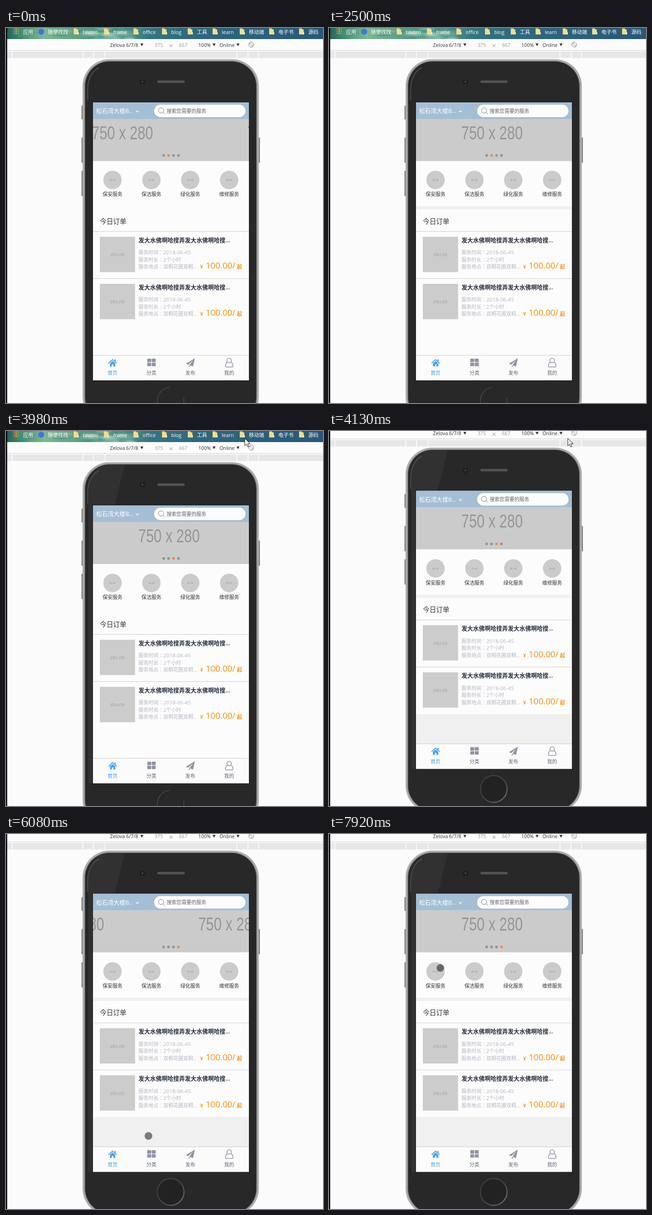
Animation, 689 px wide and 812 px high, one loop 8 s. Source, as an HTML page:

```html
<!DOCTYPE html>
<html lang="zh-CN">
<head>
<meta charset="utf-8">
<style>
html, body { margin: 0; width: 100%; height: 100%; overflow: hidden; background: #fbfbfb; }
svg { display: block; width: 689px; height: 812px; font-family: 'Open Sans', 'Noto Sans CJK SC', 'Noto Sans CJK', sans-serif; }
text { white-space: pre; }
</style>
</head>
<body>
<svg viewBox="0 0 689 812">
  <defs>
    <linearGradient id="sky">
      <stop offset="0" stop-color="#1f5f58"/><stop offset=".04" stop-color="#3f8a70"/>
      <stop offset=".12" stop-color="#7db794"/><stop offset=".22" stop-color="#5fa287"/>
      <stop offset=".3" stop-color="#3f8a7c"/><stop offset=".37" stop-color="#5c9f93"/>
      <stop offset=".45" stop-color="#357581"/><stop offset=".6" stop-color="#2e687f"/>
      <stop offset="1" stop-color="#285879"/>
    </linearGradient>
    <filter id="soft" x="-50%" y="-100%" width="200%" height="300%"><feGaussianBlur stdDeviation="4 2"/></filter>
    <clipPath id="skyClip"><path d="M0 0H689V24H0z"/></clipPath>
    <linearGradient id="rim" x2="1" y2="1">
      <stop offset="0" stop-color="#3a3a3a"/><stop offset=".5" stop-color="#444"/><stop offset="1" stop-color="#777"/>
    </linearGradient>
    <pattern id="mesh" width="2" height="2" patternUnits="userSpaceOnUse">
      <rect width="2" height="2" fill="#3c3c3c"/><path d="M0 0h1v1H0zM1 1h1v1H1z" fill="#6a6a6a"/>
    </pattern>
    <clipPath id="bannerClip"><path d="M189 197H528v91H189z"/></clipPath>
  </defs>
  <g id="page">
    <g id="browser"></g>
    <g id="phone"></g>
    <g id="screen"></g>
  </g>
  <path d="M0 0H2.5V812H0z" fill="#000"/>
  <path id="arrow" d="M0 0V16.2L3.8 12.6L6.3 18.4L8.9 17.3L6.4 11.6H11.8Z" fill="#fff" stroke="#111"/>
  <circle id="touch" r="8.7" fill="#000" fill-opacity=".49" stroke="#fff" stroke-opacity=".5" stroke-width="1.2"/>
</svg>
<script>
const $ = id => document.getElementById(id);
const text = (x, y, size, str, fill, more = '') =>
  `<text x="${x}" y="${y}" font-size="${size}" fill="${fill}" ${more}>${str}</text>`;
const rect = (x, y, w, h, fill, more = '') =>
  `<rect x="${x}" y="${y}" width="${w}" height="${h}" fill="${fill}" ${more}/>`;
const path = (d, fill, more = '') => `<path d="${d}" fill="${fill}" ${more}/>`;
const line = (d, color, width = 1) => path(d, 'none', `stroke="${color}" stroke-width="${width}"`);
const dot = (x, y, r, fill, more = '') => `<circle cx="${x}" cy="${y}" r="${r}" fill="${fill}" ${more}/>`;
const mid = 'text-anchor="middle"', bold = 'font-weight="600"', medium = 'font-weight="500"';
const colon = '<tspan lang="zh-TW">：</tspan>'; // sits in the middle of its square
// caption of a placeholder picture, in narrow lettering
const sizeLabel = (x, y, size, str) =>
  `<g transform="translate(${x} ${y}) scale(.76 1)">${text(0, 0, size, str, '#959595', mid + ' font-family="Liberation Sans, sans-serif"')}</g>`;

function sky() {
  let seed = 7, s = rect(0, 0, 689, 24, 'url(#sky)');
  const rand = () => (seed = seed * 16807 % 2147483647) / 2147483647;
  for (let i = 0; i < 22; i++)
    s += `<ellipse cx="${30 + rand() * 260}" cy="${rand() * 26}" rx="${8 + rand() * 14}" ry="${2 + rand() * 4}"
      fill="${i % 3 ? '#d8efd8' : '#1f6a60'}" opacity=".4" filter="url(#soft)"/>`;
  return `<g clip-path="url(#skyClip)">${s}</g>`;
}

function browser() {
  let s = sky();
  const colors = ['#e8594a', '#f3a43b', '#58b46a', '#4f8fe6'];
  for (let i = 0; i < 9; i++)
    s += rect(16 + i % 3 * 4.5, 1 + (i / 3 | 0) * 4.5, 3, 3, colors[(i + (i / 3 | 0)) % 4]);
  s += text(37, 13, 11, '应用', '#fff', medium) + dot(76.5, 8, 6.5, '#3d74e8') + text(91, 13, 11, '随便找找', '#fff', medium);
  [[147, 'tavoro'], [213, 'frame'], [277, 'office'], [339, 'blog'], [395, '工具'], [449, 'learn'],
   [508, '移动端'], [572, '电子书'], [637, '源码']].forEach(([x, name]) =>
    s += path(`M${x} 1h6l1 2h3v11h-10z`, '#f6dc84') + path(`M${x + 9} 9h2v5h-2z`, '#fff3c4') +
      text(x + 20, 13, 11, name, '#fff', medium));

  s += rect(0, 24, 689, 24, '#fcfcfc') + line('M0 48.5H689', '#d0d0d0');
  [[226, 'Zelova 6/7/8', '#333'], [323, '375', '#999'], [376, '667', '#999'], [418, '100%', '#333'], [464, 'Online', '#333']]
    .forEach(([x, str, c]) => s += text(x, 40.5, 10.7, str, c));
  [292, 449, 501].forEach(x => s += path(`M${x} 33.5h6.5l-3.2 6z`, '#333'));
  s += line('M355.5 35.5l6 6m0-6l-6 6', '#777') +
    dot(533, 36, 5.5, 'none', 'stroke="#888"') + path('M531 32l6 6-2 2-6-6z', '#fcfcfc', 'stroke="#888" stroke-width=".9"');

  s += rect(0, 51, 689, 14, '#e7e7e7');
  [13, 167, 190, 215, 502, 526, 549].forEach(x => s += rect(x - .8, 50, 1.6, 16, '#fdfdfd'));
  return s;
}

function phone() {
  let s = '';
  [[164, 168, 30], [164, 237, 55], [164, 309, 55], [547, 237, 55]].forEach(([x, y, h]) =>
    s += rect(x, y, 5, h, '#858585', 'rx="1.5"'));
  return s + rect(166.5, 67.5, 383, 790, '#adadad', 'rx="58"') +
    rect(170, 71, 376, 783, '#858585', 'rx="55"') + rect(172, 72.5, 372, 780, '#282828', 'rx="53"') +
    `<g id="glare">${path('M205 77Q215 73 230 73H258L236 162H189V763H179V130Q181 90 205 77z', '#313131')}</g>` +
    line('M177.5 157V132Q179 97 202 86', '#4b4b4b', 2) +
    dot(296.5, 116.5, 5.5, '#1e1d23') + dot(296.5, 116.5, 2.4, '#303048') + dot(296.5, 116.5, .9, '#668') +
    rect(329, 113.5, 59.5, 5.5, 'url(#mesh)', 'rx="2.7"') +
    dot(358, 806.5, 29, '#222', 'id="home" stroke="url(#rim)" stroke-width="2.4"') +
    `<g id="homeArc">${line('M330 814A29 29 0 0 1 356 778M386.5 800V812', '#484848', 1.6)}</g>`;
}

function order(y) {
  const grey = '#b4b6c2', orange = '#ff8c00';
  return line(`M189 ${y}H528`, '#ccc') + rect(204, y + 11.5, 76.5, 76.5, '#ccc') +
    sizeLabel(241.5, y + 53.5, 9.2, '170 x 170') +
    text(288, y + 23.3, 12.6, '发大水佛啊哈搜弄发大水佛啊哈搜...', '#2b3040', bold) +
    text(288, y + 49.5, 10.8, '服务时间' + colon, grey) + text(342, y + 49.5, 11.5, '2018-06-45', grey) +
    text(288, y + 65, 10.8, `服务时长${colon}2个小时`, grey) +
    text(288, y + 80.5, 10.8, `服务地点${colon}双桐花圃双桐...`, grey) +
    text(422, y + 80.5, 10.8, '¥', orange, bold) + text(434, y + 80.5, 18.5, '100.00/', orange) +
    text(502, y + 80.5, 10.8, '起', orange, bold);
}

function screen() {
  const cols = [231.5, 316, 400.5, 485], grey = '#9094a3';
  let s = rect(188, 160, 341, 604, '#1a1a1a') + rect(189, 161, 339, 602, '#fcfcfc');

  s += `<g clip-path="url(#bannerClip)">${rect(189, 161, 339, 127, '#cbcbcb')}<g id="slides">` +
    sizeLabel(354.3, 240.5, 40, '750 x 280') + sizeLabel(692.3, 240.5, 40, '750 x 280') + '</g></g>';
  for (let i = 0; i < 4; i++) s += dot(342.5 + i * 10.8, 276, 2.9, '#959595', 'class="page-dot"');

  s += rect(189, 161, 339, 36, '#a4bed5') + text(196, 184.3, 12.6, '松石湾大楼B...', '#fff', medium) +
    line('M282.5 179l3 3 3-3', '#fff', 1.4) + rect(322, 166, 198.5, 27, '#fcfcfc', 'rx="13.5"') +
    dot(337, 178.5, 5.6, 'none', 'stroke="#777"') + line('M341 182.5l4.5 4', '#777') +
    text(349, 183.7, 10.8, '搜索您需要的服务', '#666');

  ['保安服务', '保洁服务', '绿化服务', '维修服务'].forEach((name, i) =>
    s += dot(cols[i], 329, 20, '#cbcbcb') + sizeLabel(cols[i], 331, 5.2, '88 x 88') +
      text(cols[i], 364.2, 10.8, name, '#333', mid));

  s += rect(189, 386, 339, 7, '#f0f0f0', 'id="gap"') + text(204, 423.5, 14.4, '今日订单', '#333') +
    order(440.5) + order(542.5) + rect(189, 644.5, 339, 64, '#f0f0f0', 'id="rest"');

  s += rect(189, 708.5, 339, 54.5, '#fbfbfb') + line('M189 708.8H528', '#ccc');
  ['首页', '分类', '发布', '我的'].forEach((name, i) =>
    s += text(cols[i], 751, 10.8, name, i ? '#666b78' : '#42a5f8', mid));
  s += line('M223 726L231.7 718L240.5 726', '#42a5f8', 2) +
    path('M226 726.2L231.7 721L237.5 726.2V733H233.5V728.5H230V733H226zM236 717.5h2.2v5l-2.2-2z', '#42a5f8');
  for (let i = 0; i < 4; i++) s += rect(307 + i % 2 * 9.8, 716 + (i >> 1) * 8.7, 8.6, 7.5, grey, 'rx="1.3"');
  s += path('M410.5 715L391 727L396 729L406.5 719.5L398.5 730.2L406.5 733zM397.2 731V735L400.5 732z', grey) +
    dot(485, 720, 4.8, 'none', `stroke="${grey}" stroke-width="1.5"`) +
    line('M481.2 723.5C477.5 725.5 477 729 477 732q0 2 2 2h12.5q2 0 2-2C493.5 729 492.5 725.5 488.8 723.5', grey, 1.5);
  return s;
}

$('browser').innerHTML = browser();
$('phone').innerHTML = phone();
$('screen').innerHTML = screen();
const dots = document.querySelectorAll('.page-dot');

// pointer visits: time, x, y
const trips = [
  [[740, 293, 803], [890, 335, 640], [1040, 376, 506], [1400, 376, 506], [1700, 430, 650], [1820, 460, 725],
   [1950, 535, 764], [2090, 603, 600], [2230, 590, 250], [2380, 525, -4], [2500, 525, -4]],
  [[3550, 519, -12], [3700, 519, 16], [4430, 519, 16], [4660, 505, 120], [4900, 494, 300], [5100, 500, 420],
   [5260, 445, 540], [5410, 405, 595], [5530, 316, 612], [6480, 305, 684], [6630, 288, 677], [6780, 320, 705],
   [6920, 333, 680], [7350, 318, 500], [7770, 291, 317], [7920, 242, 290], [8000, 242, 290]]
];

function pointerAt(t) {
  const trip = trips.find(p => t >= p[0][0] && t < p[p.length - 1][0]);
  if (!trip) return null;
  const i = trip.findIndex(p => p[0] > t), [t0, x0, y0] = trip[i - 1], [t1, x1, y1] = trip[i];
  const u = (t - t0) / (t1 - t0);
  return [x0 + (x1 - x0) * u, y0 + (y1 - y0) * u];
}

const show = (id, on) => $(id).setAttribute('visibility', on ? 'visible' : 'hidden');
const move = (id, x, y) => $(id).setAttribute('transform', `translate(${x} ${y})`);

function draw(t) {
  const scrolled = t >= 4130, top = scrolled ? -31.5 : 0;
  move('page', 0, top);
  show('glare', t >= 3980);
  show('home', scrolled);
  show('homeArc', !scrolled);
  show('gap', scrolled || (t >= 430 && t < 2980));
  show('rest', scrolled);

  // the banner advances every 3 s
  const cycle = t + 55, u = Math.min(1, cycle % 3000 / 500);
  move('slides', -338 * (1 - (1 - u) ** 3), 0);
  const active = 1 + Math.floor(cycle / 3000);
  dots.forEach((d, i) => d.setAttribute('fill', i === active ? '#ff8552' : '#959595'));

  const p = pointerAt(t);
  const inside = p && p[0] > 189 && p[0] < 528 && p[1] > 161 + top && p[1] < 764 + top;
  show('touch', p && inside);
  show('arrow', p && !inside);
  if (p) move(inside ? 'touch' : 'arrow', ...p);
}

const start = performance.now();
function tick() {
  draw((performance.now() - start) % 8000);
  requestAnimationFrame(tick);
}
tick();
</script>
</body>
</html>
```
